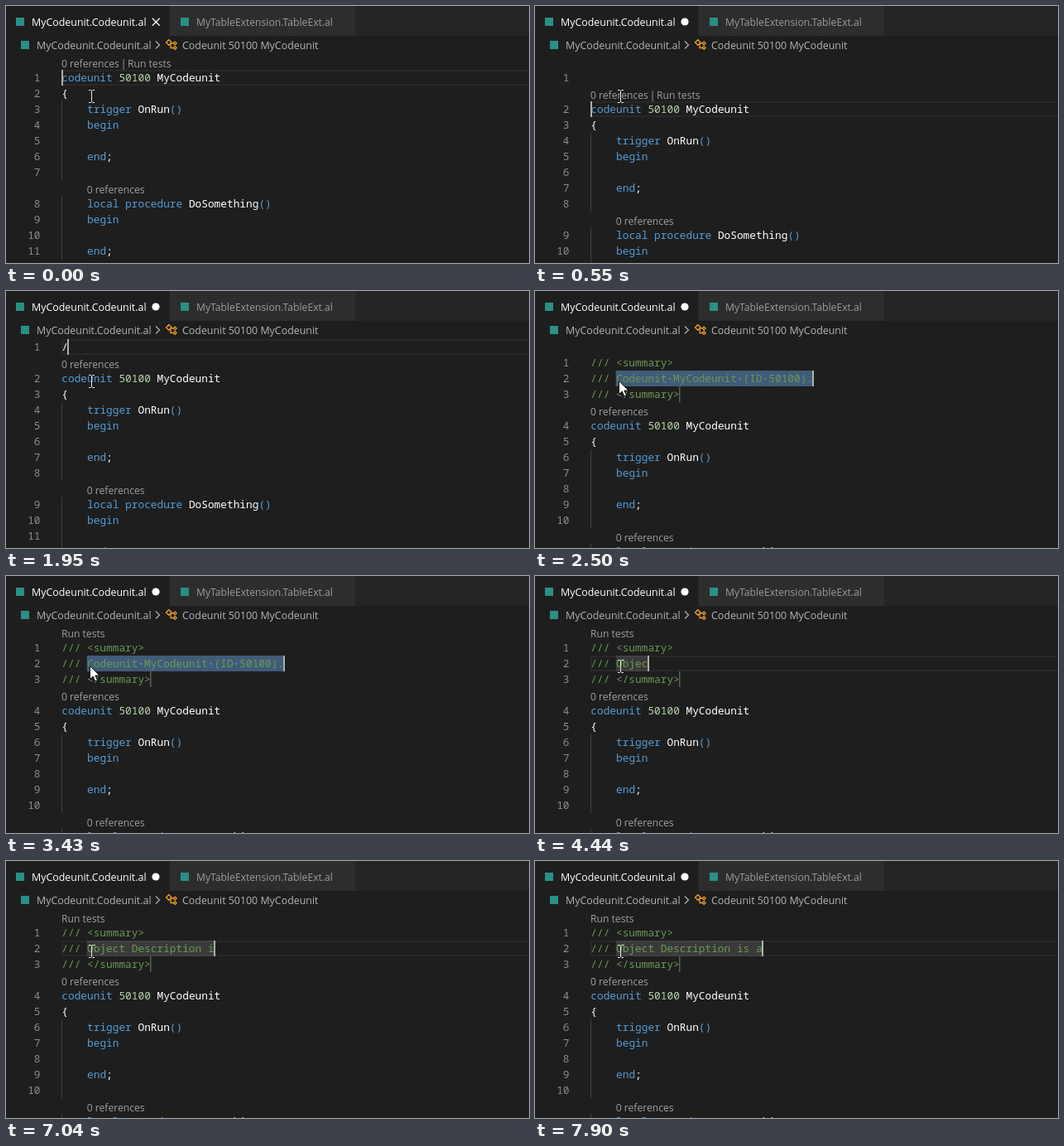
Write an HTML page with a canvas that moves like this. It is 632 px wide and 310 px high and loops after 8 s.

```html
<!DOCTYPE html>
<html lang="en">
<head>
<meta charset="utf-8">
<title>Code editor</title>
<style>
  html, body { margin: 0; width: 100%; height: 100%; overflow: hidden; background: #1e1e1e; }
  canvas { display: block; }
</style>
</head>
<body>
<canvas id="stage" width="632" height="310"></canvas>
<script>
const ctx = document.getElementById('stage').getContext('2d');
const LOOP = 8000, LEFT = 67, TOP = 58, ROW = 19, CHAR = 7.68;
const CODE = '12.8px "Noto Sans Mono", monospace';
const UI = '12.4px "Open Sans", sans-serif';
const SMALL = '12.15px "Open Sans", sans-serif';
const BLUE = '#569cd6', GREEN = '#6a9955', PALE = '#b9d4ac', PLAIN = '#fff';

const REFS = '0 references', TESTS = 'Run tests';
const DEFAULT_NOTE = 'Codeunit MyCodeunit (ID 50100).';
const TYPED = 'Object Description is a';
// Moment of each typed character
const KEYS = [3970, 4050, 4130, 4290, 4440, 4680, 4760,
  5310, 5420, 5550, 5630, 5760, 5860, 6020, 6140, 6250, 6410, 6410,
  6800, 7030, 7190, 7420, 7900];

const FIRST = ['codeunit 50100 MyCodeunit', '{', '    trigger OnRun()',
  '    begin', '', '    end;', ''];
const SECOND = ['    local procedure DoSomething()', '    begin', '', '    end;'];

const within = (t, a, b) => t >= a && t < b;
const colX = col => LEFT + col * CHAR;

function rect(x, y, w, h, color) {
  ctx.fillStyle = color;
  ctx.fillRect(x, y, w, h);
}

function text(str, x, y, color, font, align = 'left') {
  ctx.font = font;
  ctx.textAlign = align;
  ctx.fillStyle = color;
  ctx.fillText(str, x, y);
}

function line(color, width, ...points) {
  ctx.strokeStyle = color;
  ctx.lineWidth = width;
  ctx.beginPath();
  points.forEach(([x, y]) => ctx.lineTo(x, y));
  ctx.stroke();
}

function tokenColor(word) {
  if (/^(codeunit|trigger|local|procedure|begin|end|[()])$/.test(word)) return BLUE;
  return /^\d/.test(word) ? PALE : PLAIN;
}

function drawCode(str, y) {
  if (str.startsWith('//')) return text(str, LEFT + 0.3, y + 14, GREEN, CODE);
  for (const m of str.matchAll(/\w+|[^\w\s]/g))
    text(m[0], colX(m.index) + 0.3, y + 14, tokenColor(m[0]), CODE);
}

function drawLens(parts, x, y) {
  parts.forEach((part, i) => text(part, x + i * 80, y + 16, '#a0a0a0', SMALL));
  if (parts.length > 1) text('|', x + 71.8, y + 16, '#a0a0a0', SMALL);
}

function diamond(x, y, r) {
  line('#ee9d28', 1.3, [x - r, y], [x, y - r], [x + r, y], [x, y + r], [x - r, y], [x, y - r]);
}

function drawHeader(dirty) {
  rect(0, 0, 632, 36, '#252526');
  rect(0, 0, 197, 36, '#1e1e1e');
  rect(198, 0, 224, 36, '#2d2d2d');
  [[17, 19], [216, 19], [23, 47]].forEach(([x, y]) => rect(x - 5, y - 5, 10, 10, '#2a8f85'));
  text('MyCodeunit.Codeunit.al', 31, 24, '#fff', UI);
  text('MyTableExtension.TableExt.al', 230, 24, '#9c9c9c', SMALL);
  if (dirty) {
    ctx.fillStyle = '#fff';
    ctx.beginPath();
    ctx.arc(181, 19, 4.6, 0, 7);
    ctx.fill();
  } else {
    line('#f0f0f0', 1.4, [176.8, 14.8], [185.7, 23.7]);
    line('#f0f0f0', 1.4, [185.7, 14.8], [176.8, 23.7]);
  }
  text('MyCodeunit.Codeunit.al', 37, 52, '#b4b4b4', UI);
  line('#b4b4b4', 1.2, [181, 42.5], [185.5, 47], [181, 51.5]);
  diamond(196.8, 44, 3.3);
  line('#ee9d28', 1.3, [199.5, 45], [202.5, 45]);
  line('#ee9d28', 1.3, [199, 45], [199, 50.5], [202.5, 50.5]);
  diamond(204.2, 45, 1.9);
  diamond(204.2, 50.5, 1.9);
  text('Codeunit 50100 MyCodeunit', 213, 52, '#b4b4b4', UI);
}

function drawMouse(arrow) {
  if (!arrow) {
    line('#e8e8e8', 1, [100, 101.5], [102.5, 101.5], [103.5, 102.5], [104.5, 101.5], [107, 101.5]);
    line('#e8e8e8', 1, [103.5, 102], [103.5, 116]);
    line('#e8e8e8', 1, [100, 116.5], [102.5, 116.5], [103.5, 115.5], [104.5, 116.5], [107, 116.5]);
    return;
  }
  ctx.beginPath();
  [[0, 0], [0, 16], [3.7, 12.6], [6.3, 18.4], [9, 17.2], [6.4, 11.6], [11.3, 11.4]]
    .forEach(([x, y]) => ctx.lineTo(101.5 + x, 108.5 + y));
  ctx.closePath();
  ctx.fillStyle = '#fff';
  ctx.fill();
  ctx.strokeStyle = '#111';
  ctx.lineWidth = 1;
  ctx.stroke();
}

// Everything the editor shows at time t
function stateAt(t) {
  const s = {
    head: [], gap: null, lens: [REFS], row: 1, col: 0, note: null,
    selected: within(t, 2350, 3970),
    arrow: within(t, 640, 1950) || within(t, 2430, 3970),
    caret: ![[150, 550], [1490, 1950], [2970, 3430]].some(([a, b]) => within(t, a, b))
  };
  if (t < 550) {
    s.lens = [REFS, TESTS];
  } else if (t < 1950) {
    s.head = [''];
    s.gap = t < 1170 ? [] : [TESTS];
    if (t < 1170) s.lens = [REFS, TESTS];
    s.row = t < 980 ? 2 : 1;
  } else if (t < 2350) {
    s.head = ['/'.repeat(t < 2110 ? 1 : t < 2190 ? 2 : 3)];
    s.col = s.head[0].length;
  } else {
    s.note = s.selected ? DEFAULT_NOTE : TYPED.slice(0, KEYS.filter(k => k <= t).length);
    s.head = ['/// <summary>', '/// ' + s.note, '/// </summary>'];
    s.gap = t < 2810 ? [] : [TESTS];
    s.row = 2;
    s.col = 4 + s.note.length;
  }
  if (within(t, 7820, 7900)) s.lens = [];
  return s;
}

function drawNote(s, y) {
  const x = colX(4), w = s.note.length * CHAR;
  if (s.selected) rect(x, y, w, ROW, '#264f78');
  rect(x, y, w, ROW, 'rgba(124,124,124,.3)');
  rect(174, y + ROW, 1.5, ROW, '#52634e');
  if (!s.selected) return;
  for (const m of s.note.matchAll(/ /g))
    rect(colX(4.5 + m.index) - 1, y + 9, 2, 2, 'rgba(227,228,226,.3)');
}

function draw(t) {
  const s = stateAt(t);
  rect(0, 0, 632, 310, '#1e1e1e');
  drawHeader(t >= 550);

  let y = TOP, number = 0;
  const addLens = (parts, x) => { drawLens(parts, x, y); y += ROW; };
  const addLine = (str, guide) => {
    const active = ++number === s.row;
    if (active && !s.selected) {
      ctx.strokeStyle = '#282828';
      ctx.lineWidth = 2;
      ctx.strokeRect(LEFT + 1, y + 1, 600, ROW - 2);
    }
    if (s.note !== null && number === 2) drawNote(s, y);
    if (guide) rect(LEFT, y, 1, ROW, '#404040');
    text(number, 41.5, y + 14, '#8c8c8c', CODE, 'right');
    drawCode(str, y);
    if (active && s.caret) rect(Math.floor(colX(s.col)), y, 2, ROW, '#aeafad');
    y += ROW;
  };

  if (s.gap) addLens(s.gap, LEFT);
  s.head.forEach(str => addLine(str));
  addLens(s.lens, LEFT);
  FIRST.forEach((str, i) => addLine(str, i > 1));
  addLens(s.lens.slice(0, 1), colX(4));
  SECOND.forEach(str => addLine(str, true));
  drawMouse(s.arrow);
}

const start = performance.now();
function tick() {
  draw((performance.now() - start) % LOOP);
  requestAnimationFrame(tick);
}
tick();
</script>
</body>
</html>
```
